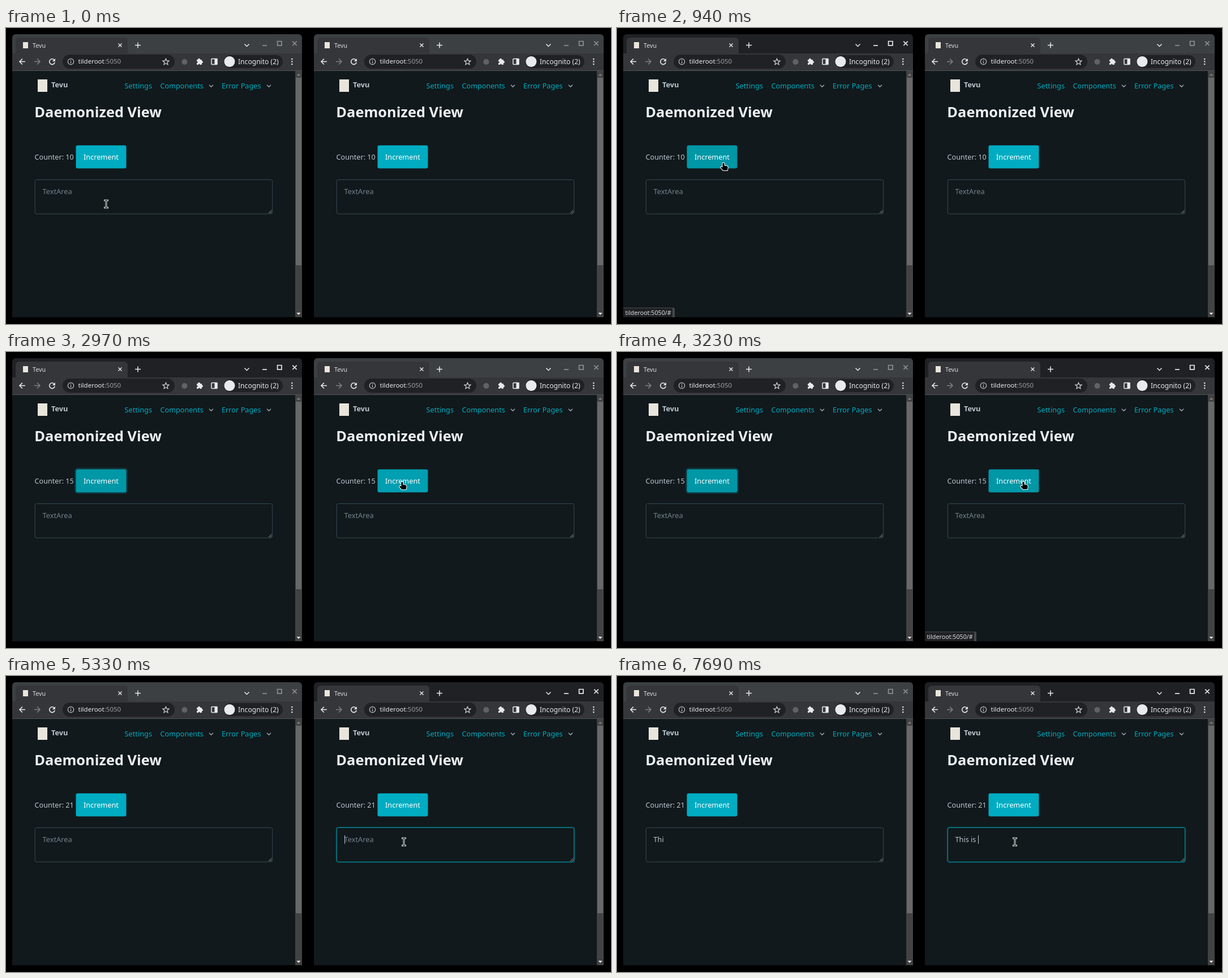
Recreate the animation shown at these times as an HTML page with a canvas. Size 1069 by 524 pixels, loop 8 s.

```html
<!DOCTYPE html>
<html lang="en">
<head>
<meta charset="utf-8">
<title>Shared view</title>
<style>
html, body { margin: 0; width: 100%; height: 100%; overflow: hidden; background: #000; }
canvas { display: block; width: 1069px; height: 524px; }
</style>
</head>
<body>
<canvas id="stage"></canvas>
<script>
const LOOP = 8000, W = 1069, H = 524, RIGHT = 533;
const FONT = '"Noto Sans", "Open Sans", sans-serif';
const NAME = 'Tevu', HOST = 'tilderoot', PORT = ':5050';
const CYAN = '#00acc1', LIGHT = '#e8eaed', TEXT = '#bbc6ce', BAR = '#35363a', DARK = '#202124';

const canvas = document.getElementById('stage');
const ctx = canvas.getContext('2d');
const scale = window.devicePixelRatio || 1;
canvas.width = W * scale;
canvas.height = H * scale;

const clamp = v => Math.max(0, Math.min(1, v));
const ramp = (t, from, to) => clamp((t - from) / (to - from));
const mix = (a, b, k) => a + (b - a) * k;
const between = (t, from, to) => t >= from && t < to;

function text(str, x, y, size, color, weight = 400) {
  ctx.font = `${weight} ${size}px ${FONT}`;
  ctx.fillStyle = color;
  ctx.fillText(str, x, y);
  return ctx.measureText(str).width;
}

function box(x, y, w, h, r, fill, stroke, width = 1) {
  ctx.beginPath();
  ctx.roundRect(x, y, w, h, r);
  paint(fill, stroke, width);
}

function disc(x, y, r, fill, stroke, width = 1) {
  ctx.beginPath();
  ctx.arc(x, y, r, 0, Math.PI * 2);
  paint(fill, stroke, width);
}

function paint(fill, stroke, width = 1) {
  if (fill) { ctx.fillStyle = fill; ctx.fill(); }
  if (stroke) { ctx.strokeStyle = stroke; ctx.lineWidth = width; ctx.stroke(); }
}

// SVG path data placed at x, y
function shape(d, x, y, fill, stroke, width = 1) {
  ctx.save();
  ctx.translate(x, y);
  const path = new Path2D(d);
  if (stroke) { ctx.strokeStyle = stroke; ctx.lineWidth = width; ctx.stroke(path); }
  if (fill) { ctx.fillStyle = fill; ctx.fill(path); }
  ctx.restore();
}

const line = (d, x, y, color, width) => shape(d, x, y, null, color, width);

// Timeline
const clicks = [1100, 1370, 1600, 1940, 2190, 3300, 3620, 3950, 4180, 4440, 4780];
const keys = [6260, 6720, 6790, 7060, 7230, 7510, 7600, 7690];
const passed = (times, t) => times.filter(v => t >= v).length;
const typed = t => 'This is '.slice(0, passed(keys, t));
const synced = t => t >= 7000 ? 'Thi' : t >= 6480 ? 'T' : '';

const moves = [
  { start: 80, step: 80, count: 7, from: [177, 311], to: [188, 239] },
  { start: 2350, step: 82, count: 9, from: [188, 239], to: [718, 230] },
  { start: 4850, step: 110, count: 2, from: [718, 230], to: [703, 293] }
];

function pointer(t) {
  let at = moves[0].from;
  for (const m of moves) {
    if (t < m.start) break;
    const k = Math.min(1, (Math.floor((t - m.start) / m.step) + 1) / m.count);
    const eased = k * k * (3 - 2 * k);
    at = m.from.map((v, i) => mix(v, m.to[i], eased));
  }
  return at;
}

function leftState(t) {
  return {
    active: between(t, 940, 3230),
    hover: ramp(t, 420, 620) * (1 - ramp(t, 3230, 3380)),
    ring: ramp(t, 1030, 1170) * (1 - ramp(t, 3230, 3380)),
    status: ramp(t, 600, 720) * (1 - ramp(t, 2430, 2600)),
    value: synced(t), focus: 0, caret: false
  };
}

function rightState(t) {
  return {
    active: t >= 3230,
    hover: ramp(t, 2850, 3050) * (1 - ramp(t, 5130, 5320)),
    ring: ramp(t, 3230, 3380) * (1 - ramp(t, 5130, 5320)),
    status: ramp(t, 3000, 3120) * (1 - ramp(t, 5150, 5320)),
    value: typed(t), focus: ramp(t, 5130, 5320),
    caret: between(t, 5160, 5740) || t >= 6260
  };
}

// Drawing
function titleBar(active) {
  const dim = active ? LIGHT : '#8d9093';
  box(11, 11, 512, 50, [6, 6, 0, 0], active ? DARK : '#3c4043');
  box(17, 17, 198, 30, [6, 6, 0, 0], BAR);
  box(30, 25, 9, 11, 0, '#e9e5dc');
  text(NAME, 47, 34.5, 10.7, '#dadce0');
  line('M-3 -3L3 3M3 -3L-3 3', 201.5, 30.5, LIGHT, 1.4);
  line('M-5 0H5M0 -5V5', 233, 30.5, LIGHT, 1.5);
  line('M-4 -2L0 2L4 -2', 425.5, 30.5, LIGHT, 1.5);
  line('M-4 0H4', 457, 31, dim, 1.7);
  line('M-3.7 -3.7H3.7V3.7H-3.7Z', 483.3, 27.2, dim, 1.7);
  line('M-3.7 -3.7L3.7 3.7M3.7 -3.7L-3.7 3.7', 510, 27.3, dim, 1.7);
}

function starPath(outer, inner) {
  let d = '';
  for (let i = 0; i < 10; i++) {
    const r = i % 2 ? inner : outer, a = i * Math.PI / 5 - Math.PI / 2;
    d += (i ? 'L' : 'M') + r * Math.cos(a) + ' ' + r * Math.sin(a);
  }
  return d + 'Z';
}
const STAR = starPath(5.8, 2.6);

function toolBar() {
  ctx.fillStyle = BAR;
  ctx.fillRect(11, 45, 512, 30);
  ctx.fillStyle = '#505357';
  ctx.fillRect(11, 75, 512, 1);
  const arrow = 'M5 0H-4.5M0 -5L-5 0L0 5';
  line(arrow, 29, 59.5, LIGHT, 1.6);
  ctx.save();
  ctx.translate(55, 59.5);
  ctx.scale(-1, 1);
  line(arrow, 0, 0, '#7c7f83', 1.6);
  ctx.restore();
  line('M3.5 -3.2A4.8 4.8 0 1 0 4.7 1.2', 81.5, 59.5, LIGHT, 1.6);
  shape('M5.4 -5.6V-0.6H0.4Z', 81.5, 59.5, LIGHT);

  box(100, 47, 198, 25, 12.5, DARK);
  disc(114.5, 59.5, 5.2, null, '#bdc1c6', 1.2);
  line('M0 -3V-1.6M0 -0.5V3', 114.5, 59.5, '#bdc1c6', 1.3);
  const hostWidth = text(HOST, 127.5, 63.3, 11.5, LIGHT);
  text(PORT, 127.5 + hostWidth, 63.3, 11.5, '#9aa0a6');
  line(STAR, 282.5, 60, '#dadce0', 1.2);

  disc(315.5, 60, 5, '#5f6368');
  box(337, 56, 9, 9, 1, LIGHT);
  disc(341, 55.7, 2, LIGHT);
  disc(346, 60.3, 2, LIGHT);
  disc(337.2, 60.6, 1.5, BAR);
  disc(341.3, 65, 1.5, BAR);
  box(363, 54.5, 10, 10, 1, null, LIGHT, 1.5);
  ctx.fillStyle = LIGHT;
  ctx.fillRect(368.5, 54, 5, 11);

  box(385, 48, 104, 23, 11.5, DARK);
  disc(395, 59.5, 9.5, LIGHT);
  text('Incognito (2)', 410, 63.5, 12.1, LIGHT);
  for (const y of [55, 59.5, 64]) disc(505.3, y, 1.3, LIGHT);
}

function scrollBar() {
  ctx.fillStyle = '#424242';
  ctx.fillRect(511, 76, 12, 436);
  ctx.fillStyle = '#686868';
  ctx.fillRect(512, 88, 10, 332);
  shape('M-3.5 2L0 -2L3.5 2Z', 517, 82.5, '#7b7b7b');
  shape('M-3.5 -2L0 2L3.5 -2Z', 517, 506, '#e4e4e4');
}

const glow = k => `rgba(0,172,193,${0.2 * k})`;

function page(state, count) {
  ctx.fillStyle = '#11191c';
  ctx.fillRect(11, 76, 512, 436);

  box(56, 91, 17, 22, 0, '#e9e5dc');
  text(NAME, 80, 105.3, 12.8, TEXT, 700);
  text('Settings', 209.5, 107, 12.75, CYAN);
  text('Components', 272.5, 107, 12.65, CYAN);
  text('Error Pages', 381, 107, 12.75, CYAN);
  for (const x of [362.5, 464.5]) line('M-3.5 -1.8L0 1.8L3.5 -1.8', x, 102.5, '#a2afb9', 1.3);
  text('Daemonized View', 50.3, 158, 25.4, '#edf0f3', 700);
  text('Counter: ' + count, 50.5, 233, 12.65, TEXT);

  if (state.ring > 0) box(122.5, 206.5, 91, 43, 4, null, glow(state.ring), 3);
  box(123.5, 207.7, 89, 40.8, 3, `rgb(0,${mix(172, 151, state.hover)},${mix(193, 167, state.hover)})`);
  text('Increment', 137, 233, 12.7, '#fff');

  const f = state.focus;
  if (f > 0) box(50.3, 267.4, 421.4, 62.8, 4, null, glow(f), 1.6);
  box(51.3, 268.5, 419.4, 60.6, 3, null, `rgb(${mix(55, 0, f)},${mix(73, 160, f)},${mix(84, 180, f)})`);
  line('M-5.5 0L0 -5.5M-2.5 0L0 -2.5', 469.5, 328, '#a7adb1', 0.9);
  if (state.value) text(state.value, 64.5, 294, 12.7, TEXT);
  else text('TextArea', 64.5, 294, 12.8, '#73828c');
  if (state.caret) {
    ctx.font = `400 12.7px ${FONT}`;
    ctx.fillStyle = TEXT;
    ctx.fillRect(Math.floor(65 + ctx.measureText(state.value).width), 282, 1, 15);
  }
}

function statusBubble(alpha) {
  if (!alpha) return;
  ctx.save();
  ctx.globalAlpha = alpha;
  box(11, 495, 91, 17, [0, 3, 0, 0], '#46494c');
  ctx.fillStyle = DARK;
  ctx.fillRect(11, 496, 87, 16);
  text(HOST + PORT + '/#', 14.5, 507.5, 10.7, '#dadce0');
  ctx.restore();
}

function browser(offset, state, count) {
  ctx.save();
  ctx.translate(offset, 0);
  titleBar(state.active);
  toolBar();
  page(state, count);
  scrollBar();
  statusBubble(state.status);
  ctx.restore();
}

const HAND = 'M-1.5 0.5Q0 -1 1.5 0.5V4.5L6.5 5.5Q8 6 7.8 8L7 13H-0.5L-4.5 8.5Q-5 6.8 -3.2 6.8L-1.5 8Z';
const ARROW = 'M0 0V13L3 10.2L5 14.5L7 13.6L5 9.4H9.2Z';
const BEAM = 'M-2.5 -6.5H2.5M0 -6.5V6.5M-2.5 6.5H2.5';

function cursor(x, y) {
  const column = x > 540 ? x - RIGHT : x;
  const inside = (l, t, r, b) => column >= l && column <= r && y >= t && y <= b;
  ctx.lineJoin = 'round';
  if (inside(123, 207, 213, 249)) shape(HAND, x, y, '#000', '#fff', 2);
  else if (inside(51, 268, 471, 330)) {
    ctx.lineCap = 'square';
    line(BEAM, x, y + 0.7, '#fff', 2.8);
    line(BEAM, x, y + 0.7, '#000', 1);
    ctx.lineCap = 'butt';
  } else shape(ARROW, x, y, '#000', '#fff', 2);
  ctx.lineJoin = 'miter';
}

function draw(t) {
  ctx.setTransform(scale, 0, 0, scale, 0, 0);
  ctx.fillStyle = '#000';
  ctx.fillRect(0, 0, W, H);
  const count = 10 + passed(clicks, t);
  browser(0, leftState(t), count);
  browser(RIGHT, rightState(t), count);
  cursor(...pointer(t));
}

const begin = performance.now();
function frame() {
  draw((performance.now() - begin) % LOOP);
  requestAnimationFrame(frame);
}
frame();
</script>
</body>
</html>
```
